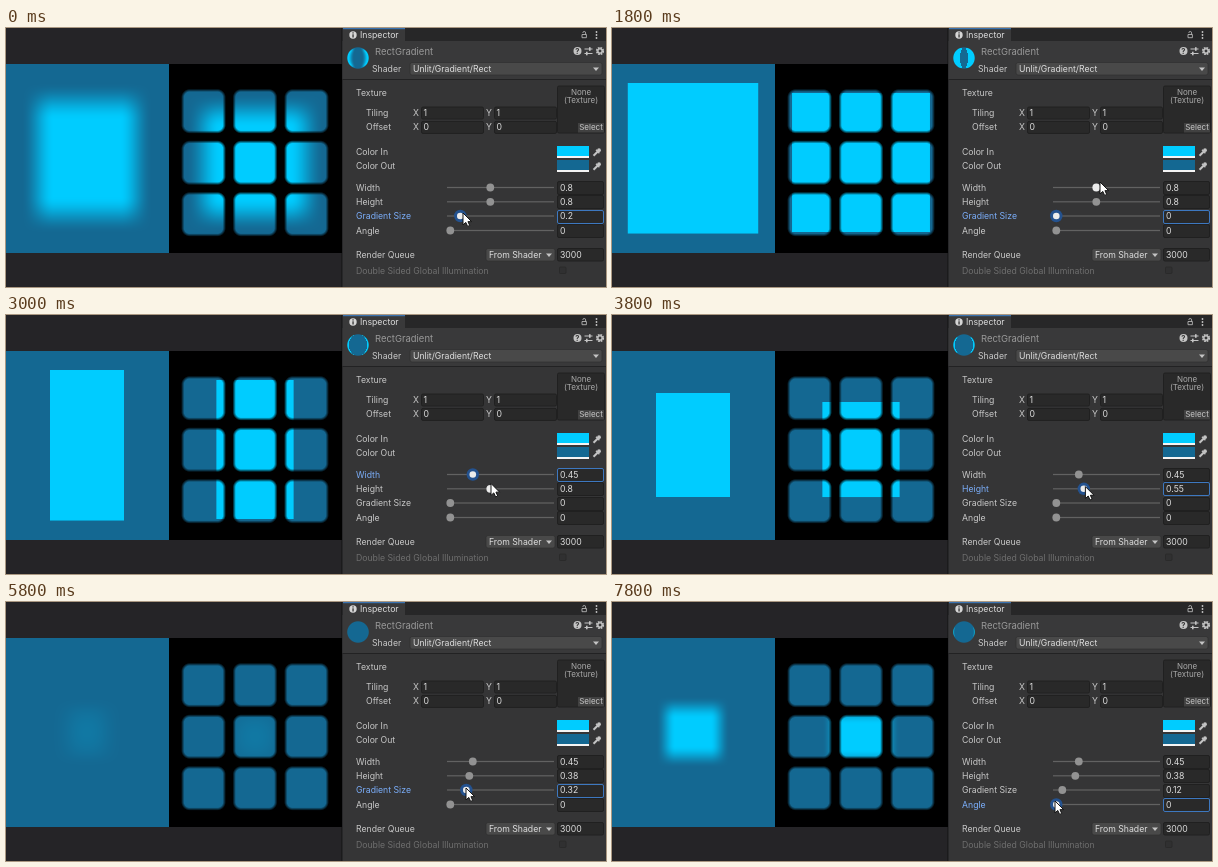
An HTML page with a canvas that plays this animation: 600x259 px, repeating every 8 s.

```html
<!DOCTYPE html>
<html lang="en">
<head>
<meta charset="utf-8">
<title>Rect gradient inspector</title>
<style>
  html, body { margin: 0; width: 100%; height: 100%; overflow: hidden; background: #252427; }
  svg, canvas { position: absolute; left: 0; top: 0; width: 600px; height: 259px; }
  text { font: 8.7px Inter, sans-serif; fill: #c8c8c8; white-space: pre; }
  .bright { fill: #dedede; }
</style>
</head>
<body>
<svg id="panel" viewBox="0 0 600 259"></svg>
<canvas id="preview" width="600" height="259"></canvas>
<svg viewBox="0 0 600 259">
  <path id="cursor" d="M0 0V11L2.6 8.7L4.3 12.4L6.2 11.5L4.6 8H8Z" fill="#fff" stroke="#111" stroke-width=".9"/>
</svg>
<script>
const DURATION = 8000, STEP = 200;
const COLOR_IN = [0, 204, 255], COLOR_OUT = [20, 104, 146];
const css = c => `rgb(${c})`;

// Keyframes: [time, ...values], linear in between
const TRACKS = {
  width: [[2000, .8], [2600, .45]],
  height: [[3200, .8], [4200, .38]],
  size: [[0, .2], [1000, 0], [5000, 0], [5800, .32], [6000, .32], [6600, .06], [6800, .06], [7200, .12]],
  angle: [[0, 0]],
  cursor: [[0, 457, 185], [1000, 446, 186], [1400, 446, 186], [1800, 488, 154], [2000, 487, 156],
    [2600, 469, 157], [3000, 485, 168.5], [3200, 486, 171], [4200, 465, 172], [4400, 465, 172],
    [4800, 445, 187], [5000, 446, 187], [5800, 460, 186], [6000, 460, 186], [6600, 447, 184],
    [6800, 447, 184], [7200, 452, 186], [7400, 452, 187], [7800, 443, 199]]
};
const FOCUS = [[0, 'size'], [2000, 'width'], [3200, 'height'], [5000, 'size'], [7600, 'angle']];
const SLIDERS = [['width', 'Width', 159.5], ['height', 'Height', 173.8],
  ['size', 'Gradient Size', 188], ['angle', 'Angle', 202.5]];

const clamp = v => Math.min(1, Math.max(0, v));

function sample(keys, t) {
  const next = keys.findIndex(k => k[0] > t);
  if (next === 0) return keys[0].slice(1);
  if (next < 0) return keys[keys.length - 1].slice(1);
  const a = keys[next - 1], b = keys[next], p = (t - a[0]) / (b[0] - a[0]);
  return a.slice(1).map((v, i) => v + (b[i + 1] - v) * p);
}

// ---- Static panel ----
const rect = (x, y, w, h, fill, extra = '') =>
  `<rect x="${x}" y="${y}" width="${w}" height="${h}" fill="${fill}" ${extra}/>`;
const text = (x, y, s, extra = '') => `<text x="${x}" y="${y}" ${extra}>${s}</text>`;
const field = (x, y, w, h, extra = '') =>
  rect(x, y, w, h, '#292929', `rx="1.5" stroke="#202020" stroke-width="1" ${extra}`);
const dropdown = (x, y, w, h, label) =>
  rect(x, y, w, h, '#494949', 'rx="2" stroke="#303030" stroke-width=".7"') +
  text(x + 3, y + 9.3, label, 'class="bright"') +
  `<path d="M${x + w - 9} ${y + 5}h6l-3 3.5z" fill="#c4c4c4"/>`;
const stroke = (d, width = 1.1) =>
  `<path d="${d}" fill="none" stroke="#c4c4c4" stroke-width="${width}"/>`;
const dot = (x, y, r, fill = '#c4c4c4') => `<circle cx="${x}" cy="${y}" r="${r}" fill="${fill}"/>`;

function header() {
  return rect(336, 0, 264, 259, '#353536') + rect(335, 0, 1.5, 259, '#1b1b1c') +
    rect(336.5, 0, 264, 13, '#272728') + rect(337, 0, 62, 13, '#39393a') +
    rect(337, 0, 62, 1.2, '#3a72b0') + rect(336.5, 13, 264, 38, '#39393a') +
    rect(336.5, 51, 264, 1, '#222223') +
    dot(347, 7, 3.7, '#d6d6d6') + rect(346.4, 6.3, 1.3, 3.2, '#333') + rect(346.4, 4.3, 1.3, 1.2, '#333') +
    text(354, 10.2, 'Inspector', 'class="bright"') +
    stroke('M576 6.5h4.4v3.2h-4.4zM579.6 6.5v-1.6a1.4 1.4 0 0 0 -2.8 0', .8) +
    [4, 7, 10].map(y => dot(590.5, y, .9)).join('') +
    text(369, 26.8, 'RectGradient', 'style="font-size:9.45px;fill:#999"') +
    dot(571.5, 23, 4) + text(569.3, 25.8, '?', 'style="font-size:7.5px;font-weight:700;fill:#333"') +
    stroke('M578.5 21h8M578.5 25.5h8') + rect(583, 19.2, 1.6, 3.6, '#c4c4c4') + rect(580, 23.7, 1.6, 3.6, '#c4c4c4') +
    '<circle cx="594" cy="23" r="3.1" fill="none" stroke="#c4c4c4" stroke-width="2" stroke-dasharray="1.7 .73"/>' +
    '<circle cx="594" cy="23" r="2.1" fill="none" stroke="#c4c4c4" stroke-width="1.3"/>' +
    text(366, 43.8, 'Shader') + dropdown(404, 34.5, 192, 12.5, 'Unlit/Gradient/Rect');
}

function vectorRow(label, y, value) {
  return text(360, y, label) + [['X', 407], ['Y', 480]].map(([axis, x]) =>
    text(x, y, axis) + field(x + 8.5, y - 9, 62, 12) + text(x + 10.5, y, value, 'class="bright"')).join('');
}

function colorRow(label, y, color) {
  return text(350, y, label) +
    rect(551, y - 9, 32, 10, css(color)) + rect(551, y + 1, 32, 2, '#f4f4f4') +
    stroke(`M587.5 ${y + .8}l4.3 -4.3`, 2) + stroke(`M590 ${y - 5.2}l3.4 3.4`, 1.4) +
    dot(593, y - 4.8, 1.9);
}

function sliderRow([id, label, y]) {
  return text(350, y + 3.2, label, `id="${id}-label"`) +
    rect(441, y - .6, 107, 1.2, '#626262') +
    `<circle id="${id}-halo" cy="${y}" r="6.2" fill="#24528f"/>` +
    `<circle id="${id}-knob" cy="${y}"/>` +
    field(551.5, Math.floor(y - 6) + .5, 46, 13, `id="${id}-field"`) +
    text(554, y + 3.2, '', `id="${id}-value" class="bright"`);
}

document.getElementById('panel').innerHTML = header() +
  text(350, 68, 'Texture') + vectorRow('Tiling', 88, '1') + vectorRow('Offset', 102.4, '0') +
  field(551.5, 58, 47, 47) +
  text(575, 67, 'None', 'text-anchor="middle" style="font-size:8px;fill:#aaa"') +
  text(575, 75.3, '(Texture)', 'text-anchor="middle" style="font-size:8px;fill:#aaa"') +
  rect(572, 95, 26, 9.5, '#414141') +
  text(585, 102.2, 'Select', 'text-anchor="middle" style="font-size:8px"') +
  colorRow('Color In', 127, COLOR_IN) + colorRow('Color Out', 141, COLOR_OUT) +
  SLIDERS.map(sliderRow).join('') +
  text(350, 230, 'Render Queue') + dropdown(480, 220.5, 69, 12.5, 'From Shader') +
  field(551.5, 220.5, 46, 12.5) + text(554, 230, '3000', 'class="bright"') +
  text(350, 245.8, 'Double Sided Global Illumination', 'style="fill:#6e6e6e"') +
  rect(553.5, 239, 6.5, 6.5, '#303031', 'rx="1" stroke="#2a2a2a"');

// ---- Gradient preview ----
const ctx = document.getElementById('preview').getContext('2d');

function paint(x0, y0, w, h, shader) {
  const image = ctx.createImageData(w, h);
  for (let i = 0; i < w * h; i++) {
    image.data.set(shader(x0 + i % w + .5, y0 + Math.floor(i / w) + .5), i * 4);
  }
  ctx.putImageData(image, x0, y0);
}

function smoothstep(a, b, v) {
  const p = clamp((v - a) / (b - a));
  return p * p * (3 - 2 * p);
}

// Rising edge minus falling edge of a centred band
function band(v, extent, size) {
  const half = extent / 2, soft = Math.max(size, .002);
  return clamp(smoothstep(-half, soft - half, v) - smoothstep(half - soft, half, v));
}

function drawPreview({ width, height, size }) {
  const color = (u, v) => {
    const k = band(u, width, size) * band(v, height, size);
    return COLOR_OUT.map((c, i) => c + (COLOR_IN[i] - c) * k);
  };

  paint(0, 36, 163, 189, (x, y) => [...color((x - 81) / 164, (y - 130.1) / 189), 255]);

  paint(163, 36, 173, 189, (x, y) => {
    const dx = x - 249, dy = y - 134.7, pitch = 51.5, half = 20.8, radius = 7;
    const local = d => Math.abs(d - pitch * Math.max(-1, Math.min(1, Math.round(d / pitch)))) - half + radius;
    const qx = local(dx), qy = local(dy);
    const distance = Math.hypot(Math.max(qx, 0), Math.max(qy, 0)) + Math.min(Math.max(qx, qy), 0) - radius;
    const alpha = clamp(.5 - distance / 3.2);
    return [...color(dx / 172, dy / 174).map(c => c * alpha), 255];
  });

  // Material ball: the texture seam faces the viewer
  paint(340, 18, 24, 24, (x, y) => {
    const r = 10.7, dx = (x - 352) / r, dy = (y - 30) / r;
    const latitude = Math.asin(Math.max(-1, Math.min(1, dy)));
    const longitude = Math.asin(Math.max(-1, Math.min(1, dx / Math.cos(latitude))));
    const u = .5 - Math.abs(longitude) / (2 * Math.PI) * 1.7;
    return [...color(u, latitude / Math.PI), 255 * clamp((1 - Math.hypot(dx, dy)) * r + .5)];
  });
}

// ---- Animation ----
const set = (id, attributes) => {
  const element = document.getElementById(id);
  for (const name in attributes) element.setAttribute(name, attributes[name]);
};

function draw(t) {
  const [cx, cy] = sample(TRACKS.cursor, t);
  const focus = FOCUS.filter(([start]) => start <= t).pop()[1];
  const values = {};
  for (const [id, , y] of SLIDERS) {
    const value = values[id] = +sample(TRACKS[id], t)[0].toFixed(2);
    const x = 444.3 + 50 * value, active = id === focus;
    const bright = active || Math.hypot(cx - x, cy - y) < 7;
    set(id + '-halo', { cx: x, visibility: active ? 'visible' : 'hidden' });
    set(id + '-knob', { cx: x, r: active ? 3.3 : 3.9, fill: bright ? '#ececec' : '#929292' });
    set(id + '-label', { style: active ? 'fill:#7baefa' : '' });
    set(id + '-field', { stroke: active ? '#3d78c0' : '#202020' });
    document.getElementById(id + '-value').textContent = value;
  }
  set('cursor', { transform: `translate(${cx} ${cy}) scale(1.08)` });
  drawPreview(values);
}

let shown = -1;
const start = performance.now();
function tick() {
  const elapsed = Math.max(0, performance.now() - start) % DURATION;
  const step = Math.floor(elapsed / STEP);
  if (step !== shown) draw((shown = step) * STEP);
  requestAnimationFrame(tick);
}
tick();
</script>
</body>
</html>
```
